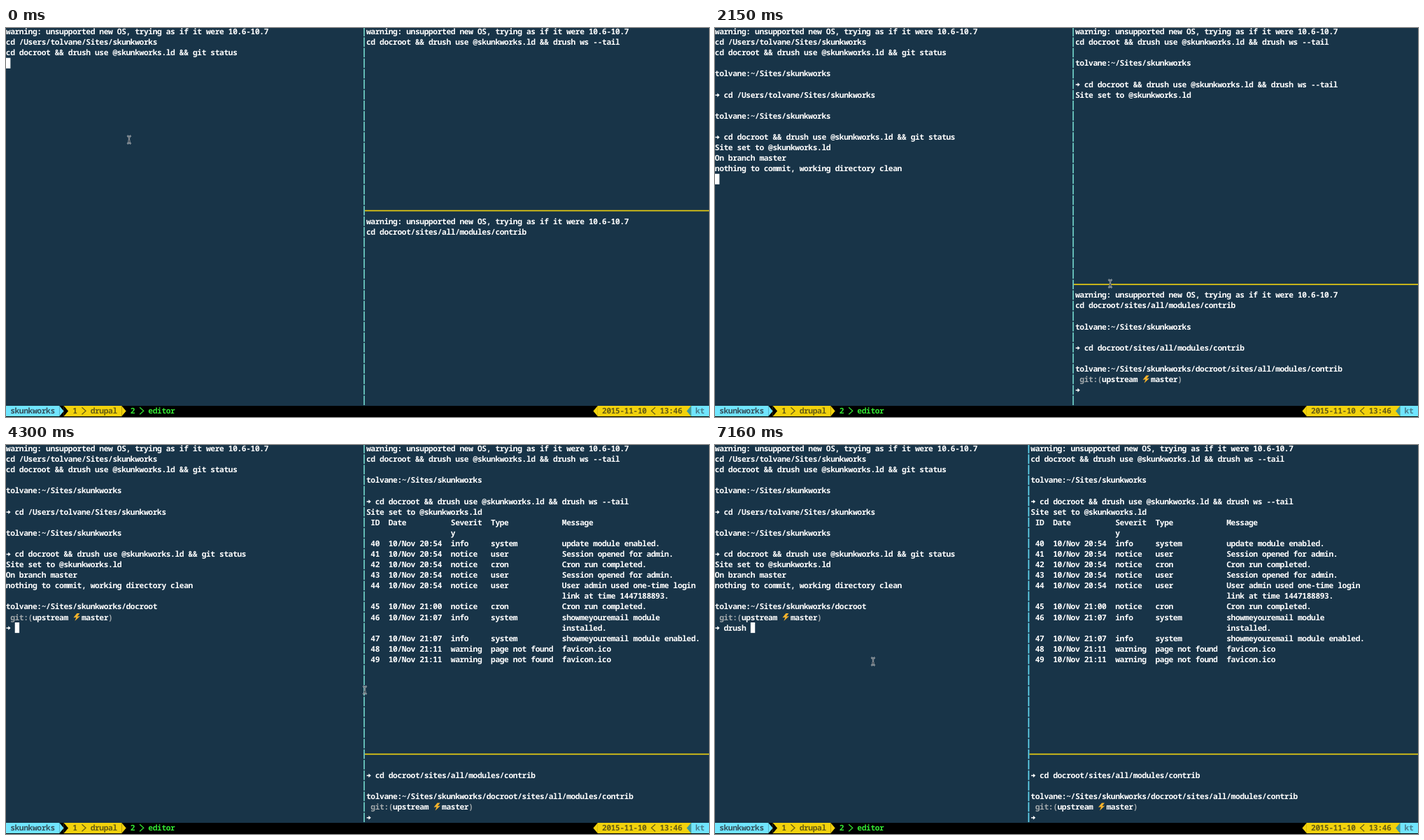
Recreate the animation shown at these times as an HTML page with a canvas. Size 1005x557 px, loop 8000 ms.

```html
<!DOCTYPE html>
<html lang="en">
<head>
<meta charset="utf-8">
<title>Terminal panes</title>
<style>
html, body { margin: 0; width: 100%; height: 100%; overflow: hidden; background: #183448; }
canvas { display: block; }
</style>
</head>
<body>
<canvas id="stage" width="1005" height="557"></canvas>
<script>
const ctx = document.getElementById('stage').getContext('2d');
const CELL = 6.36, LINE = 15.09, TOP = -2.5, LOOP = 8000, STATUS = 36;
const BG = '#183448', WHITE = '#fff', GRAY = '#a3a9ac', CYAN = '#70e5ff', YELLOW = '#f2d20c';
const DARK = '#665c14', GREEN = '#33e833';

const HOME = 'tolvane:~/Sites/skunkworks';
const WARN = 'warning: unsupported new OS, trying as if it were 10.6-10.7';
const CD = 'cd /Users/tolvane/Sites/skunkworks';
const GIT = 'cd docroot && drush use @skunkworks.ld && git status';
const TAIL = 'cd docroot && drush use @skunkworks.ld && drush ws --tail';
const CONTRIB = 'cd docroot/sites/all/modules/contrib';
const SITE = 'Site set to @skunkworks.ld';
const BRANCH = ' git:(upstream \u26a1master)';

const entry = (id, date, level, type, message) =>
  ' ' + id.padEnd(4) + date.padEnd(14) + level.padEnd(9) + type.padEnd(16) + message;
const log = (id, time, level, type, message) => entry(id, '10/Nov ' + time, level, type, message);
const more = message => entry('', '', '', '', message);

const LEFT = [WARN, CD, GIT, '', HOME, '', '→ ' + CD, '', HOME, '', '→ ' + GIT,
  SITE, 'On branch master', 'nothing to commit, working directory clean', '',
  HOME + '/docroot', BRANCH, '→ '];
const UPPER = [WARN, TAIL, '', HOME, '', '→ ' + TAIL, SITE,
  entry('ID', 'Date', 'Severit', 'Type', 'Message'),
  entry('', '', 'y', '', ''),
  log('40', '20:54', 'info', 'system', 'update module enabled.'),
  log('41', '20:54', 'notice', 'user', 'Session opened for admin.'),
  log('42', '20:54', 'notice', 'cron', 'Cron run completed.'),
  log('43', '20:54', 'notice', 'user', 'Session opened for admin.'),
  log('44', '20:54', 'notice', 'user', 'User admin used one-time login'),
  more('link at time 1447188893.'),
  log('45', '21:00', 'notice', 'cron', 'Cron run completed.'),
  log('46', '21:07', 'info', 'system', 'showmeyouremail module'),
  more('installed.'),
  log('47', '21:07', 'info', 'system', 'showmeyouremail module enabled.'),
  log('48', '21:11', 'warning', 'page not found', 'favicon.ico'),
  log('49', '21:11', 'warning', 'page not found', 'favicon.ico')];
const LOWER = [WARN, CONTRIB, '', HOME, '', '→ ' + CONTRIB, '',
  HOME + '/docroot/sites/all/modules/contrib', BRANCH, '→'];

// Each step overrides part of the state; left, upper and lower count visible lines.
const steps = [
  [0, { left: 3, upper: 2, lower: 2, split: 80, bar: 17, caret: [3, 0], mouse: [176, 160], typed: '' }],
  [360, { mouse: [440, 168] }],
  [710, { mouse: [535, 183] }],
  [1070, { left: 11, caret: null, mouse: [573, 253] }],
  [1430, { upper: 6, lower: 10, caret: [11, 0] }],
  [1790, { caret: null, mouse: [573, 291] }],
  [2150, { left: 14, upper: 7, bar: 24, caret: [14, 0], mouse: [565, 366] }],
  [2510, { left: 18, bar: 29, caret: [17, 2], mouse: [555, 440] }],
  [3220, { upper: 21, caret: null, mouse: [496, 346] }],
  [3580, { mouse: [512, 351] }],
  [3940, { mouse: [513, 351] }],
  [4300, { caret: [17, 2] }],
  [5020, { split: 73, caret: null, mouse: [463, 351] }],
  [5380, { split: 70, caret: [17, 2], mouse: [448, 349] }],
  [6090, { mouse: [226, 310] }],
  [6450, { caret: null }],
  [6810, { typed: 'dr', caret: [17, 4] }],
  [7160, { typed: 'drush ', caret: [17, 8] }]
];

const rowY = row => TOP + row * LINE;

function rect(x, y, w, h, color) {
  ctx.fillStyle = color;
  ctx.fillRect(x, y, w, h);
}

function poly(points, color) {
  ctx.fillStyle = color;
  ctx.beginPath();
  points.forEach(([x, y]) => ctx.lineTo(x, y));
  ctx.fill();
}

function bolt(x, y) {
  poly([[x + 6, y + 2], [x + 1, y + 8.3], [x + 5, y + 7.7], [x + 3, y + 13],
    [x + 10.5, y + 6], [x + 6.5, y + 6.5], [x + 10, y + 2]], '#f7b32b');
}

function prompt(x, y) {
  rect(x + 0.5, y + 7.3, 4, 1.5, WHITE);
  poly([[x + 3.3, y + 5.2], [x + 6.6, y + 8], [x + 3.3, y + 10.9]], WHITE);
}

function write(row, col, text, color = WHITE) {
  ctx.fillStyle = color;
  [...text].forEach((ch, i) => {
    const x = (col + i) * CELL;
    if (ch === '→') prompt(x, rowY(row));
    else if (ch !== ' ') ctx.fillText(ch, x + CELL / 2, rowY(row) + 11.6);
    ctx.fillStyle = color;
  });
}

function line(row, col, text) {
  if (text !== BRANCH) return write(row, col, text);
  write(row, col + 1, 'git:(', GRAY);
  write(row, col + 6, 'upstream');
  bolt((col + 15) * CELL, rowY(row));
  write(row, col + 17, 'master');
  write(row, col + 23, ')', GRAY);
}

function panes(s) {
  const col = s.split + 1, x = (s.split + 0.5) * CELL;
  LEFT.slice(0, s.left).forEach((text, i) => line(i, 0, text));
  write(17, 2, s.typed);
  UPPER.slice(0, s.upper).forEach((text, i) => line(i, col, text));

  // A pane too short for its text keeps the last lines.
  const hidden = Math.max(0, LOWER.length - (STATUS - 1 - s.bar));
  LOWER.slice(hidden, s.lower).forEach((text, i) => line(s.bar + 1 + i, col, text));

  const tint = s.split === 80 ? '#70d0c8' : '#62d8f2';
  for (let row = 0; row < STATUS; row++) rect(x - 0.8, rowY(row) + 0.8, 1.7, LINE - 1.5, tint);
  rect(x + 1, rowY(s.bar) + 6.7, 1005, 1.7, '#e6cb12');
}

function arrow(col, dir, color) {
  const y = Math.round(rowY(STATUS)), tip = (dir > 0 ? col + 1 : col) * CELL, base = tip - dir * CELL;
  poly([[base, y], [tip, y + 7.5], [base, y + 15]], color);
}

function chevron(col, dir, color) {
  const mid = (col + 0.5) * CELL, y = rowY(STATUS) + LINE / 2;
  ctx.strokeStyle = color;
  ctx.lineWidth = 1.2;
  ctx.beginPath();
  ctx.moveTo(mid - dir * 2.8, y - 5);
  ctx.lineTo(mid + dir * 2.8, y);
  ctx.lineTo(mid - dir * 2.8, y + 5);
  ctx.stroke();
}

function statusBar() {
  const y = Math.round(rowY(STATUS));
  const fill = (from, to, color) => rect(from * CELL, y, (to - from) * CELL, 15, color);
  rect(0, y, 1005, 16, '#000');
  fill(0, 12, CYAN);
  arrow(12, 1, CYAN);
  fill(13, 26, YELLOW);
  arrow(13, 1, '#000');
  arrow(26, 1, YELLOW);
  arrow(132, -1, YELLOW);
  fill(133, 154, YELLOW);
  arrow(153, -1, '#3b9aa0');
  fill(154, 158.1, CYAN);
  write(STATUS, 1, 'skunkworks', '#35525c');
  write(STATUS, 15, '1', DARK);
  chevron(17, 1, DARK);
  write(STATUS, 19, 'drupal', DARK);
  write(STATUS, 28, '2', GREEN);
  chevron(30, 1, GREEN);
  write(STATUS, 32, 'editor', GREEN);
  write(STATUS, 134, '2015-11-10', DARK);
  chevron(145, -1, DARK);
  write(STATUS, 147, '13:46', DARK);
  write(STATUS, 155, 'kt', '#4a7f8c');
}

function pointer([x, y]) {
  const beam = new Path2D(`M${x - 2.5} ${y - 6}L${x} ${y - 3.5}L${x + 2.5} ${y - 6}M${x} ${y - 3.5}V${y + 3.5}
    M${x - 2.5} ${y + 6}L${x} ${y + 3.5}L${x + 2.5} ${y + 6}M${x - 1.5} ${y + 2}H${x + 1.5}`);
  for (const [width, color] of [[2.2, '#d5dade'], [0.9, '#101c26']]) {
    ctx.lineWidth = width;
    ctx.strokeStyle = color;
    ctx.stroke(beam);
  }
}

function draw(now) {
  const t = now % LOOP;
  const s = Object.assign({}, ...steps.filter(([at]) => at <= t).map(([, change]) => change));
  ctx.font = '600 11.3px "Noto Sans Mono", "DejaVu Sans Mono", monospace';
  ctx.textAlign = 'center';
  ctx.textRendering = 'geometricPrecision';
  rect(0, 0, 1005, 557, BG);
  panes(s);
  if (s.caret) rect(s.caret[1] * CELL, rowY(s.caret[0]), CELL, LINE, WHITE);
  statusBar();
  pointer(s.mouse);
  requestAnimationFrame(draw);
}
requestAnimationFrame(draw);
</script>
</body>
</html>
```
